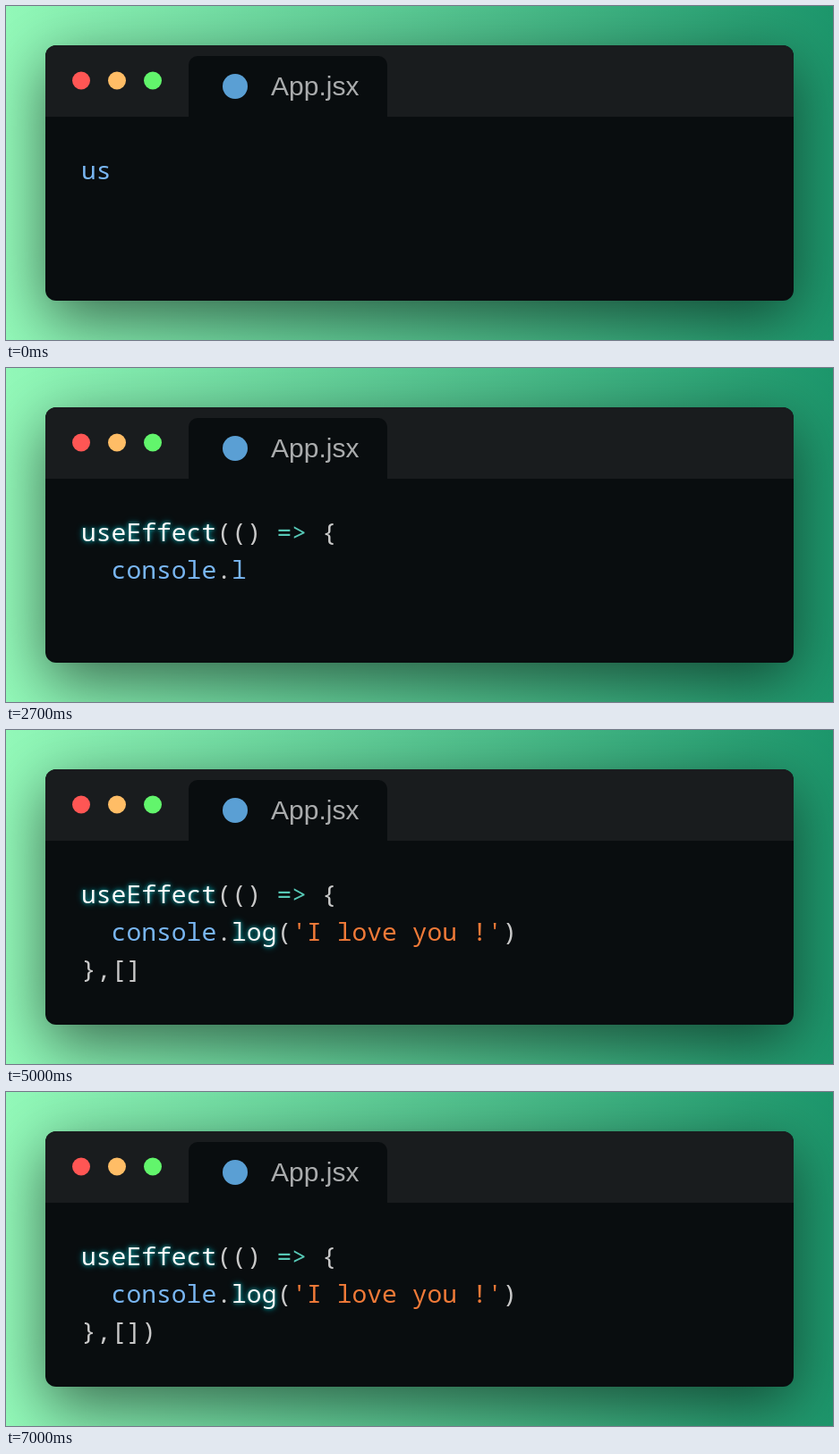
Recreate the animation shown at these times as an HTML page. Size 924 by 374 pixels, loop 7100 ms.

```html
<!DOCTYPE html>
<html lang="en">
<head>
<meta charset="utf-8">
<title>Typed code</title>
<style>
  html, body { margin: 0; width: 100%; height: 100%; overflow: hidden; }
  .stage {
    position: relative; width: 924px; height: 374px; overflow: hidden;
    background: linear-gradient(90deg, #93f9b9, #1d976c);
  }
  .window {
    position: absolute; left: 44px; top: 44px; width: 836px; height: 286px;
    border-radius: 12px; background: #090d0f;
    box-shadow: 0 20px 68px rgba(0, 0, 0, .55);
  }
  svg { position: absolute; left: 0; top: 0; }
  .title { font: 30px "Liberation Sans", Arial, sans-serif; fill: #aaacad; }
  pre {
    position: absolute; left: 84px; top: 162px; margin: 0;
    font: 28px/42px "Noto Sans Mono", monospace; color: #c9c9c9;
  }
  .name { color: #79b6f2; }
  .op { color: #57c8b6; }
  .str { color: #f07a38; }
  .call {
    color: #fdfdfd; font-weight: 500;
    text-shadow: 0 0 2px #001716, 0 0 3px #03edf975, 0 0 5px #03edf975, 0 0 8px #03edf975;
  }
</style>
</head>
<body>
<div class="stage">
  <div class="window"></div>
  <svg width="924" height="374" viewBox="0 0 924 374">
    <path d="M44 124V56a12 12 0 0 1 12-12H868a12 12 0 0 1 12 12V124Z" fill="#191c1e"/>
    <path d="M204 124V66a10 10 0 0 1 10-10H416a10 10 0 0 1 10 10V124Z" fill="#090d0f"/>
    <circle cx="84" cy="83.5" r="10" fill="#ff5654"/>
    <circle cx="124" cy="83.5" r="10" fill="#ffbd66"/>
    <circle cx="164" cy="83.5" r="10" fill="#62f56c"/>
    <circle cx="256" cy="90" r="14" fill="#5a9fd4"/>
    <text class="title" x="296" y="100">App.jsx</text>
  </svg>
  <pre id="code"></pre>
</div>
<script>
  const LOOP = 7100, STEP = 100, FIRST = 2;
  const tokens = [
    ["useEffect", "call"], ["(() ", ""], ["=>", "op"], [" {\n  ", ""],
    ["console", "name"], [".", ""], ["log", "call"], ["(", ""],
    ["'I love you !'", "str"], [")\n},[])", ""]
  ];
  const code = document.getElementById("code");
  let shown = -1;

  function span(text, type) {
    const el = document.createElement("span");
    el.className = type;
    el.textContent = text;
    return el;
  }

  function render(time) {
    const count = FIRST + Math.floor((time % LOOP) / STEP);
    if (count === shown) return;
    shown = count;
    const parts = [];
    let left = count;
    for (const [text, type] of tokens) {
      if (left <= 0) break;
      // A name turns into a call once its bracket is typed.
      const pending = type === "call" && left <= text.length;
      parts.push(span(text.slice(0, left), pending ? "name" : type));
      left -= text.length;
    }
    code.replaceChildren(...parts);
  }

  function tick(now) {
    render(now);
    requestAnimationFrame(tick);
  }

  render(0);
  requestAnimationFrame(tick);
</script>
</body>
</html>
```
